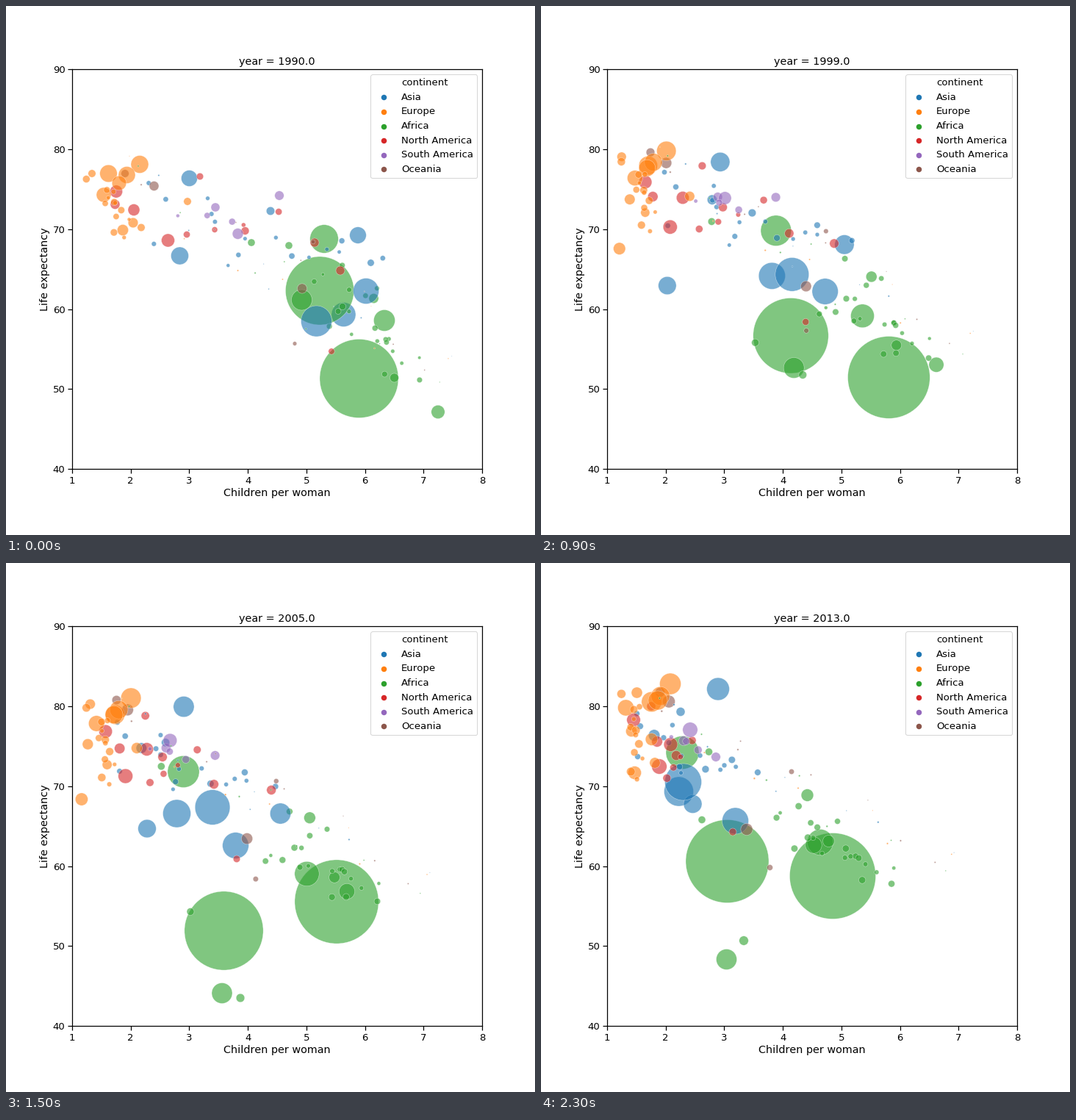
Animation of 720x720 px, one loop 2400 ms. Source, as a matplotlib script:

```python
import numpy as np
import matplotlib.pyplot as plt
from matplotlib.animation import FuncAnimation

plt.rcParams.update({
    "font.family": "DejaVu Sans", "text.kerning_factor": 6,
    "axes.labelsize": 14.4, "axes.titlesize": 14.4,
    "xtick.labelsize": 13.2, "ytick.labelsize": 13.2, "legend.fontsize": 13.2,
    "axes.linewidth": 1.25,
    "xtick.major.size": 6, "ytick.major.size": 6,
    "xtick.major.width": 1.25, "ytick.major.width": 1.25,
})

YEARS = 24
ASIA, EUROPE, AFRICA = "Asia", "Europe", "Africa"
NORTH, SOUTH, OCEANIA = "North America", "South America", "Oceania"
COLORS = {ASIA: "#1f77b4", EUROPE: "#ff7f0e", AFRICA: "#2ca02c",
          NORTH: "#d62728", SOUTH: "#9467bd", OCEANIA: "#8c564b"}
# Years at which a path with n waypoints passes through them
KEYS = {2: (0, 23), 3: (0, 11, 23), 4: (0, 7, 15, 23), 5: (0, 7, 15, 19, 23)}

rng = np.random.default_rng(4)
t = np.arange(YEARS)
growth = (t / (YEARS - 1)) ** .8
paths, sizes, colors = [], [], []


def smooth_path(pts):
    """Cubic Hermite curve through the waypoints, sampled once per year."""
    keys = np.array(KEYS[len(pts)], float)
    slope = np.gradient(pts, keys, axis=0)
    i = np.clip(np.searchsorted(keys, t, "right") - 1, 0, len(keys) - 2)
    h = (keys[i + 1] - keys[i])[:, None]
    u = (t - keys[i])[:, None] / h
    return ((2*u**3 - 3*u**2 + 1) * pts[i] + (u**3 - 2*u**2 + u) * h * slope[i]
            + (3*u**2 - 2*u**3) * pts[i + 1] + (u**3 - u**2) * h * slope[i + 1])


def bubble(name, r0, r1, *pts, last=YEARS):
    """Bubble growing from r0 to r1 along stage-pixel waypoints."""
    x, y = smooth_path(np.array(pts, float)).T
    paths.append(np.c_[1 + (x - 90) * 7 / 558, 90 - (y - 86.4) * 50 / 543.6])
    r = r0 + (r1 - r0) * growth
    sizes.append(np.where(t <= last, (2 * r) ** 2, 0))
    colors.append(COLORS[name])


def crowd(name, n, radii, start, end, spread, dip=0):
    """Small bubbles strung along one line, drifting to another line."""
    (a, b), (c, d) = np.array(start, float), np.array(end, float)
    for u in (np.arange(n) + .5) / n:
        noise = rng.normal(0, spread, 2)
        p = a + (b - a) * u + noise
        q = c + (d - c) * u + noise * .7
        sag = (0, rng.choice([0, 0, 0, dip]))
        r = rng.uniform(*radii)
        bubble(name, r, r * 1.2, p, (p + q) / 2 + sag, q)


bubble(ASIA, 16.5, 20, (459.5, 420), (345.5, 377.5), (232.5, 341), (187.5, 311))

bubble(AFRICA, 53.5, 58.5, (480.5, 507), (478, 515), (450, 461), (427, 446), (397, 426))
bubble(AFRICA, 46.5, 56.5, (427, 387.5), (357, 425.5), (296.5, 500.5), (273, 429), (253.5, 406))
bubble(AFRICA, 19.3, 22.5, (433, 317), (347, 311), (241.5, 284), (192.5, 258))
bubble(AFRICA, 14.5, 17.6, (515, 428), (450.5, 421), (409.5, 423), (380, 380))
bubble(AFRICA, 14, 14, (402.5, 400), (360, 460), (294, 585.5), (271, 561.5), (252.5, 539.5))
bubble(AFRICA, 9.2, 11.2, (588, 552.5), (557, 502), (464, 447), (371, 384))
bubble(AFRICA, 6, 8, (528.5, 506), (472.5, 451), (391.5, 378.5))
bubble(AFRICA, 6.6, 8.4, (500.5, 398), (438, 361.5), (362.5, 316))
bubble(AFRICA, 4.6, 6.3, (458, 409), (373.5, 469), (319, 592), (299.5, 551.5), (276, 514))
bubble(AFRICA, 5, 5, (385, 326), (309, 435), (251, 474.5), (234, 384), (219, 349.5))
bubble(AFRICA, 5, 5, (334, 322), (218.5, 287.5), (228.5, 257))
crowd(AFRICA, 20, (2, 4), ((440, 365), (560, 500)), ((330, 340), (480, 430)), 18, dip=60)

bubble(ASIA, 11, 15.4, (249.5, 234.5), (243, 207), (241, 171.5))
bubble(ASIA, 12, 12.5, (236.5, 340), (174, 380), (192, 361.5), (206.5, 328))
bubble(ASIA, 17.5, 18, (490, 388), (412, 388.5), (312.5, 384.5), (264.5, 351))
bubble(ASIA, 21, 25, (422.5, 429), (322.5, 353), (193.5, 298))
bubble(ASIA, 11.3, 15.3, (479, 312), (427, 320), (373.5, 341), (330, 345), last=16)
bubble(ASIA, 5.7, 7.8, (360, 279), (211.5, 260), (154, 234.5))
bubble(ASIA, 4.7, 6, (496.5, 349.5), (254, 268), (190, 202.5))
crowd(ASIA, 16, (1.8, 4.6), ((205, 270), (480, 350)), ((140, 225), (270, 290)), 25)

bubble(NORTH, 8.6, 9.3, (150, 252.5), (140, 236.5), (126, 213.5))
bubble(NORTH, 8, 9.4, (174, 277.5), (194.5, 258), (176.5, 247))
bubble(NORTH, 9, 10.3, (220.5, 319), (169, 297), (161, 277))
bubble(NORTH, 6.5, 7.4, (148.5, 270), (158, 243))
bubble(NORTH, 4.7, 6, (264, 232), (150, 195))
bubble(NORTH, 5.4, 6.6, (325.5, 306), (233.5, 269), (184, 262))
bubble(NORTH, 6, 6.5, (420, 322), (210, 290), last=16)
bubble(NORTH, 6, 6.6, (455, 360), (386.5, 317), (310, 300), last=16)
bubble(NORTH, 4.2, 5, (443, 470), (343.5, 421), (261, 366))
crowd(NORTH, 4, (2.8, 4.6), ((210, 300), (390, 285)), ((155, 290), (210, 240)), 6)

bubble(OCEANIA, 6.5, 8.5, (201.5, 245), (166.5, 208), (174, 188.5))
bubble(OCEANIA, 6.6, 8.1, (403, 384.5), (350.5, 380), (280, 362.5))
bubble(OCEANIA, 2.8, 4, (393, 459.5), (311.5, 414.5))
bubble(OCEANIA, 2.9, 3.6, (418, 321), (341, 284))
bubble(OCEANIA, 5.3, 6.5, (162, 228), (148, 194), (162, 176))

bubble(EUROPE, 12, 14.5, (182, 215.5), (169.5, 193), (176, 164.5))
bubble(EUROPE, 11.8, 13.7, (139.5, 228), (147, 214), (150.5, 189))
bubble(EUROPE, 11.5, 12.7, (164.5, 230), (152, 208.5), (162.5, 181))
bubble(EUROPE, 9.8, 13, (154, 241), (144, 216), (159, 187))
bubble(EUROPE, 10, 11, (133, 257), (126.5, 229), (115.5, 197))
bubble(EUROPE, 5.2, 7.5, (117, 228), (110, 200.5), (130.5, 176.5))
bubble(EUROPE, 5.2, 8.4, (247, 266), (193.5, 257), (150.5, 240))
bubble(EUROPE, 7.6, 9, (159, 305), (101, 331), (127.5, 285.5))
bubble(EUROPE, 6.8, 7.6, (173, 295), (114, 257), (123, 229))
bubble(EUROPE, 5.2, 7.2, (184, 301.5), (137, 278), (155, 272))
crowd(EUROPE, 12, (2.4, 5), ((132, 235), (158, 305)), ((126, 175), (128, 290)), 9)

bubble(SOUTH, 6.3, 6.3, (372, 258), (238, 264))
bubble(SOUTH, 6, 6.6, (285, 274), (232, 257), (194, 242))
bubble(SOUTH, 7.4, 10.2, (315.5, 310), (239, 253), (203, 227))
crowd(SOUTH, 3, (2, 4.8), ((225, 280), (315, 290)), ((175, 230), (215, 255)), 5)

for name in (AFRICA, ASIA, EUROPE, OCEANIA):
    crowd(name, 7, (.45, 1.2), ((140, 230), (620, 510)), ((125, 190), (580, 420)), 25)

paths, sizes = np.array(paths), np.array(sizes)

fig = plt.figure(figsize=(10, 10), dpi=72, facecolor="white")
fig.subplots_adjust(left=.125, right=.9, bottom=.125, top=.88)
ax = fig.add_subplot()
dots = ax.scatter(*paths[:, 0].T, s=sizes[:, 0], c=colors, alpha=.6,
                  edgecolors="white", linewidths=.5)
ax.scatter([], [], s=0, label="continent")
for name, color in COLORS.items():
    ax.scatter([], [], s=36, color=color, linewidths=1.5, label=name)
ax.legend(loc="upper right")
ax.set(xlim=(1, 8), ylim=(40, 90), xticks=range(1, 9), yticks=range(40, 91, 10),
       xlabel="Children per woman", ylabel="Life expectancy")
title = ax.set_title("year = 1990.0")


def draw(i):
    dots.set_offsets(paths[:, i])
    dots.set_sizes(sizes[:, i], dpi=fig.dpi)
    title.set_text(f"year = {1990 + i:.1f}")
    return dots, title


anim = FuncAnimation(fig, draw, frames=YEARS, interval=100, repeat=True)
plt.show()
```
